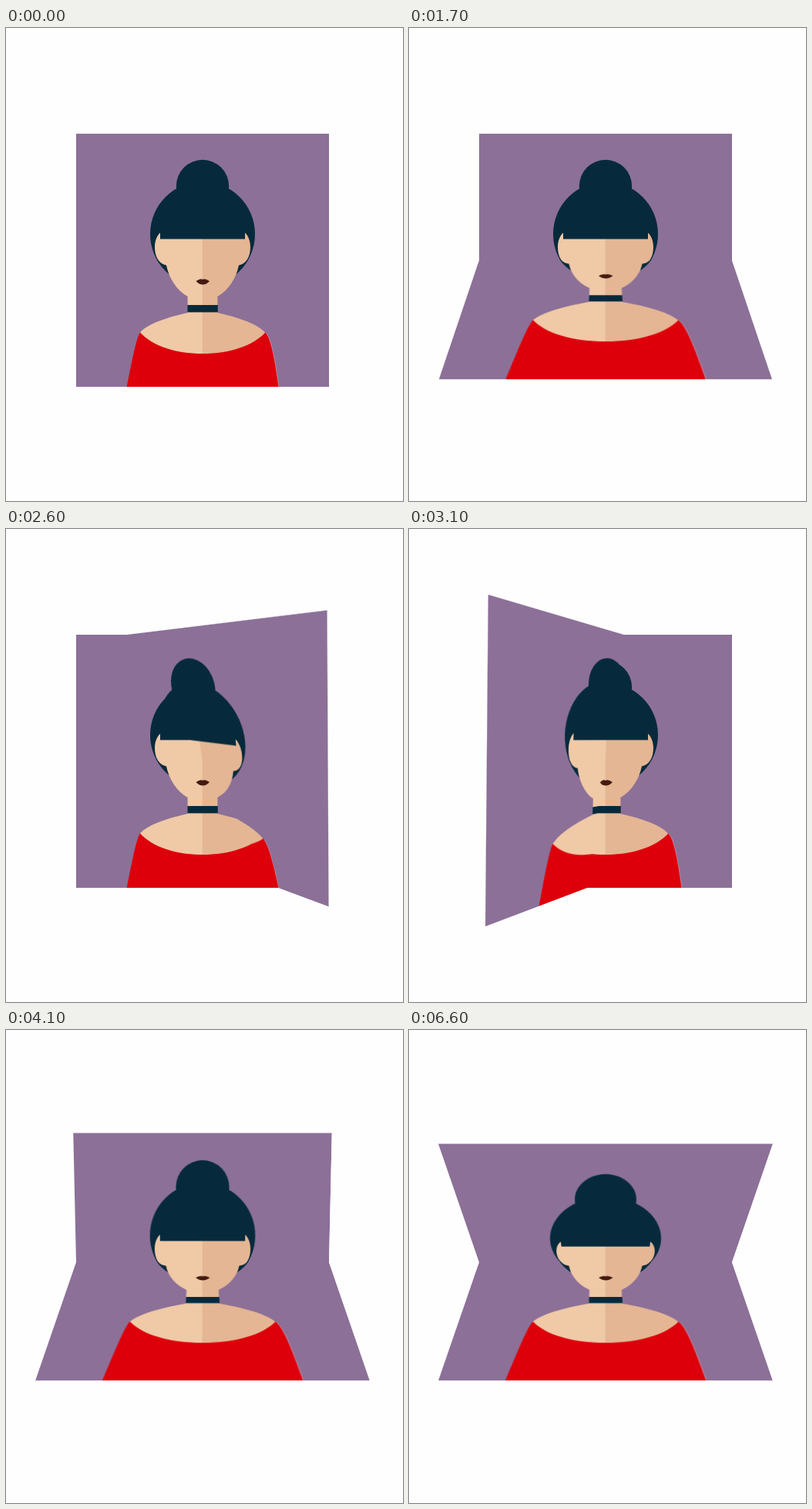
An HTML page for the animation above (6700 ms loop, 515x613 px).

```html
<!DOCTYPE html>
<html lang="en">
<head>
<meta charset="utf-8">
<title>Folding portrait</title>
<style>
  html, body { margin: 0; width: 100%; height: 100%; overflow: hidden; background: #fefefe; }
  #card { position: absolute; left: 91px; top: 137px; width: 328px; height: 328px; perspective: 475px; }
  #card svg { position: absolute; left: 0; top: 0; display: block; overflow: hidden; }
</style>
</head>
<body>
<div id="card">
  <svg width="328" height="328" viewBox="91 137 328 328">
    <rect x="91" y="137" width="328" height="328" fill="#8c7098"/>
    <g fill="#062a3c">
      <circle cx="255" cy="205" r="34.2"/>
      <circle cx="255" cy="267" r="68"/>
    </g>
    <path class="skin" fill="#f0c9a7" d="M255.3 262H206C198 264 193 273 193 284C193 297 199 306 208 307.5C211 323 221 340 235.6 348V369C214 374 185 382 174 394.5V424H255.3Z"/>
    <rect x="200" y="250" width="110" height="23.5" fill="#062a3c"/>
    <rect x="235.4" y="359" width="39.4" height="9.4" fill="#062a3c"/>
    <path fill="#dd000a" d="M174 394.5C190 412 220 422 255 422S320 412 336.500 394.500C345 403 350 438 354 466H156.500C163 434 169 401 174 394.500Z"/>
    <path fill="none" stroke="#d7a3b0" stroke-width=".6" d="M337 395C345 403 350 438 354 466"/>
    <path fill="#431b10" d="M246.500 328Q251 325 253.500 325.200Q255 326.500 257 325.200Q259.500 325 264 328Q260 332.600 255.300 332.600Q250.500 332.600 246.500 328Z"/>
  </svg>
</div>
<script>
const LOOP = 6700, STEP = 100, SIZE = 328, FOLD = 45;
const card = document.getElementById('card');
const front = card.querySelector('svg');

// The shaded half of the skin mirrors the lit half.
const skin = front.querySelector('.skin');
const shade = skin.cloneNode();
shade.setAttribute('fill', '#e4b694');
shade.setAttribute('transform', 'translate(510 0) scale(-1 1)');
skin.after(shade);

const back = front.cloneNode(true);
card.prepend(back);

function progress(t, start, end) {
  const x = Math.min(1, Math.max(0, (t - start) / (end - start)));
  return (1 - Math.cos(Math.PI * x)) / 2;
}

// Shows the half on the side of direction phi, bent towards the viewer.
function fold(panel, phi, angle) {
  const nx = Math.cos(phi), ny = Math.sin(phi), c = SIZE / 2;
  const point = (along, out) =>
    `${(c + ny * along + nx * out).toFixed(3)}px ${(c - nx * along + ny * out).toFixed(3)}px`;
  panel.style.clipPath =
    `polygon(${[point(-300, -0.5), point(300, -0.5), point(300, 300), point(-300, 300)].join()})`;
  panel.style.transform = `rotate3d(${ny.toFixed(6)}, ${(-nx).toFixed(6)}, 0, ${angle}deg)`;
}

function draw() {
  const t = Math.floor(performance.now() % LOOP / STEP) * STEP;
  const phi = Math.PI / 2 - 2 * Math.PI * progress(t, 1833, 3782);
  fold(front, phi, FOLD * progress(t, 311, 1811));
  fold(back, phi + Math.PI, FOLD * progress(t, 3819, 5335));
  requestAnimationFrame(draw);
}
draw();
</script>
</body>
</html>
```
